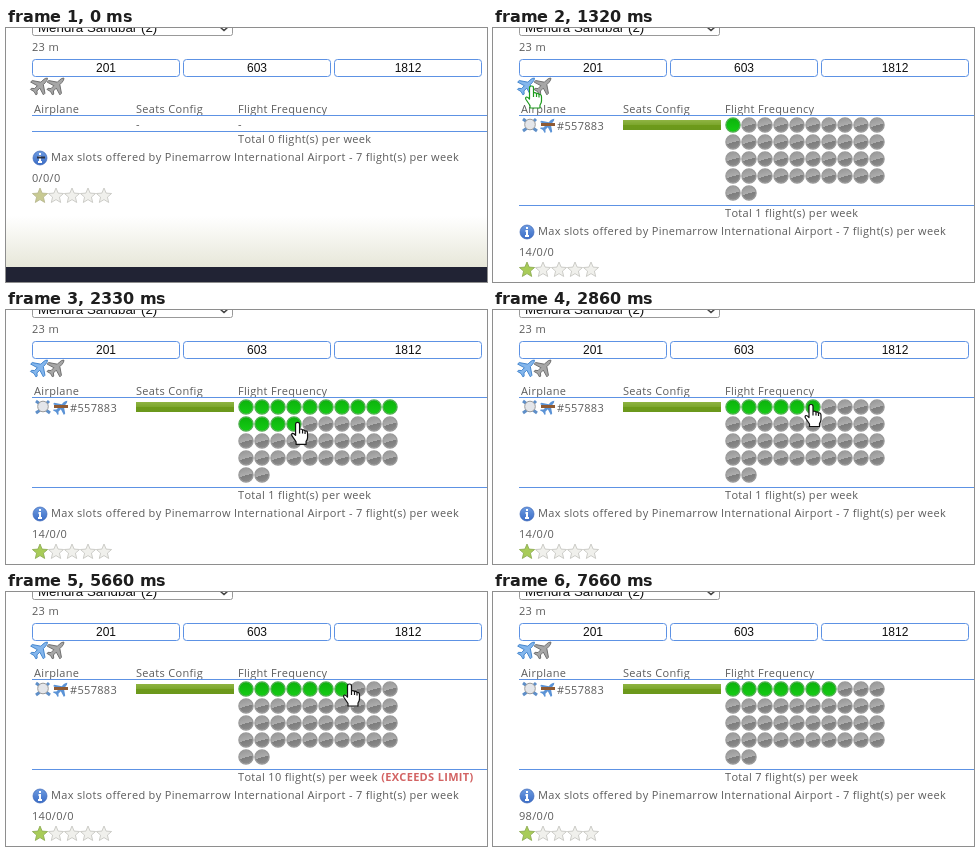
An HTML page for the animation above (7810 ms loop, 481x254 px).

```html
<!DOCTYPE html>
<html lang="en">
<head>
<meta charset="utf-8">
<style>
  html, body { margin: 0; width: 100%; height: 100%; overflow: hidden; background: #fff; }
  svg { display: block; width: 481px; height: 254px; }
  text { font: 11px "Open Sans", sans-serif; letter-spacing: .32px; font-kerning: none; fill: #5c5c5c; }
  .field { font: 12px "Liberation Sans", Arial, sans-serif; letter-spacing: 0; fill: #111; }
  .warning { font-weight: bold; fill: #d36464; }
  .rule { stroke: #5d92e4; }
  .dot { fill: url(#off); stroke: #999; stroke-width: 1.3; }
  .dot.lit { fill: url(#on); stroke: #4fae4f; }
  .plane { fill: #a6a6a6; stroke: #6c6c6c; stroke-width: .9; }
  .plane.chosen { fill: #84b6ec; stroke: #3f83cc; }
  .star { fill: #f0f0ec; stroke: #c2c2bd; stroke-width: .8; }
  .star:first-child { fill: #c8ca92; stroke: #b4b48c; }
  .loaded .star:first-child { fill: #a8cc58; stroke: #8aa850; }
  .loaded .before, svg:not(.loaded) .after { display: none; }
  svg:not(.loaded) #summary { transform: translateY(-74px); }
</style>
</head>
<body>
<svg id="stage" viewBox="0 0 481 254">
  <defs>
    <linearGradient id="page" x2="0" y2="1"><stop stop-color="#fff"/><stop offset="1" stop-color="#e7e7d9"/></linearGradient>
    <linearGradient id="bar" x2="0" y2="1"><stop stop-color="#8fb443"/><stop offset=".5" stop-color="#7ba62c"/><stop offset=".5" stop-color="#6d9a1a"/><stop offset="1" stop-color="#6b981c"/></linearGradient>
    <linearGradient id="off" x1=".35" x2=".65" y2="1"><stop stop-color="#989898"/><stop offset=".52" stop-color="#adadad"/><stop offset=".52" stop-color="#7d7d7d"/><stop offset="1" stop-color="#8c8c8c"/></linearGradient>
    <linearGradient id="on" x2="0" y2="1"><stop stop-color="#0cb20c"/><stop offset="1" stop-color="#14cc14"/></linearGradient>
    <linearGradient id="info" x2="0" y2="1"><stop stop-color="#6d9be0"/><stop offset="1" stop-color="#3a6cc6"/></linearGradient>
    <path id="plane" d="M0-10.5Q1.7-9 1.7-6V-3L9 2V4.2L1.7 2V6L4 8V9.5L0 8.5-4 9.5V8L-1.7 6V2L-9 4.2V2L-1.7-3V-6Q-1.7-9 0-10.5Z"/>
  </defs>

  <!-- aircraft picker -->
  <rect x="26.5" y="-14.5" width="200" height="22" rx="2" fill="#fff" stroke="#999"/>
  <text class="field" x="32" y="4" style="font-size:13.33px">Mendra Sandbar (2)</text>
  <path d="M214-1l4 3.5 4-3.5" fill="none" stroke="#444" stroke-width="1.5"/>
  <text x="26" y="23">23 m</text>
  <g id="fields"></g>
  <use id="firstPlane" class="plane" href="#plane" transform="translate(34 57.5) rotate(45)"/>
  <use class="plane" href="#plane" transform="translate(50.5 57.5) rotate(45)"/>

  <!-- table -->
  <text x="28" y="85">Airplane</text>
  <text x="130" y="85">Seats Config</text>
  <text x="232" y="85">Flight Frequency</text>
  <path class="rule" d="M26 87.5H481"/>
  <g class="before"><text x="130" y="100">-</text><text x="232" y="100">-</text></g>
  <g class="after">
    <path d="M30 91l4 3M43 91l-3 3M30 103l4-3M44 103l-4-3" stroke="#5f8fc8" stroke-width="3"/>
    <circle cx="37" cy="96.5" r="5.3" fill="#e4e6ea" stroke="#9a9a9a"/>
    <use href="#plane" transform="translate(55 97) rotate(45) scale(.85)" fill="#5b93d6"/>
    <path d="M48 95h14v3h-14z" fill="#8f5a33"/>
    <text x="64" y="102">#557883</text>
    <rect x="130" y="92" width="98" height="10" fill="url(#bar)"/>
    <g id="dots"></g>
  </g>

  <!-- summary and page foot -->
  <g id="summary">
    <path class="rule" d="M26 177.5H481"/>
    <text x="232" y="189"><tspan id="total"></tspan> <tspan id="warning" class="warning"></tspan></text>
    <circle cx="34" cy="204" r="7" fill="url(#info)" stroke="#3d68b8" stroke-width=".7"/>
    <path d="M34 199v2M32.5 203H34V208M32 208h4" fill="none" stroke="#fff" stroke-width="2"/>
    <path class="before" d="M31 203.5h8" stroke="#2b3142" stroke-width="2"/>
    <text x="45" y="207">Max slots offered by Pinemarrow International Airport - 7 flight(s) per week</text>
    <text id="seats" x="26" y="228"></text>
    <g id="stars"></g>
    <rect y="262" width="481" height="51" fill="url(#page)"/>
    <rect y="313" width="481" height="90" fill="#212334"/>
  </g>

  <g id="cursor" fill="#fff" stroke-linejoin="round">
    <path id="arrow" d="M.5.5V16.5L4.2 13 6.8 19 9.3 18 6.8 12H11.8Z"/>
    <path id="hand" stroke-width="1.2" d="M-2 2Q-2 0 0 0 2 0 2 2V7Q3.5 6 5 7.5 6.5 7 7.5 8.5 10 8 10 11V15Q10 17 8.5 19V22H-1.5V19.5L-5.5 13.5Q-6.5 11.5-5 11-4 10.8-2 13ZM2 7V11M5 7.5V11M7.5 8.5V11.5"/>
  </g>
</svg>
<script>
const LOOP = 7810, LOADED = 1320, SLOTS = 7, SEATS = 14;
const COLUMNS = 10, DOTS = 42, DOT = 16, ROW = 17, LEFT = 232, TOP = 89;
const HOVER_DELAY = 50;
const dotClicks = [4180, 4890, 6120];

const gestures = [
  { at: 50, lasts: 320, to: [38.5, 58] },     // to the first plane
  { at: 1390, lasts: 560, to: [297.5, 138] }, // into the dots
  { at: 2050, lasts: 450, to: [288, 97] },
  { at: 2730, lasts: 70, to: [318, 94.5] },
  { at: 3720, lasts: 160, to: [339, 96] },    // seventh dot
  { at: 4300, lasts: 210, to: [386, 97] },    // last of the row
  { at: 5350, lasts: 250, to: [343.5, 92] },  // back to the seventh
  { at: 6430, lasts: 160, to: [365, 290] },   // out at the bottom
  { at: 6600, lasts: 1, to: [490, 205] },
  { at: 7180, lasts: 400, to: [422, -30] }    // past the right edge
];

const el = id => document.getElementById(id);
const repeat = (n, make) => Array.from({ length: n }, (_, i) => make(i)).join("");

function cursorAt(t) {
  let x = 464, y = 285;
  for (const { at, lasts, to } of gestures) {
    const part = Math.min(1, Math.max(0, (t - at) / lasts));
    x += (to[0] - x) * part;
    y += (to[1] - y) * part;
  }
  return [x, y];
}

// Number of the dot under the fingertip, 0 for none
function hoveredDot(t) {
  const [x, y] = cursorAt(t), dx = x - LEFT, dy = y + 1.5 - TOP;
  const column = Math.floor(dx / DOT), row = Math.floor(dy / ROW);
  const index = row * COLUMNS + column;
  const hit = column >= 0 && column < COLUMNS && row >= 0 && dy % ROW < DOT && index < DOTS;
  return hit ? index + 1 : 0;
}

function flightsAt(t) {
  const click = dotClicks.filter(c => c <= t).pop();
  return click ? hoveredDot(click) : t < LOADED ? 0 : 1;
}

function starPoints(cx, cy) {
  return repeat(10, i => {
    const r = i % 2 ? 3.6 : 8, a = (i / 5 - .5) * Math.PI;
    return `${cx + r * Math.cos(a)},${cy + r * Math.sin(a)} `;
  });
}

el("fields").innerHTML = repeat(3, i =>
  `<rect x="${26.5 + 151 * i}" y="31.5" width="147" height="17" rx="3" fill="#fff" stroke="#5d92e4"/>
   <text class="field" x="${100 + 151 * i}" y="44" text-anchor="middle">${["201", "603", "1812"][i]}</text>`);
el("dots").innerHTML = repeat(DOTS, i =>
  `<circle class="dot" cx="${LEFT + 8 + DOT * (i % COLUMNS)}" cy="${TOP + 8 + ROW * Math.floor(i / COLUMNS)}" r="7.1"/>`);
el("stars").innerHTML = repeat(5, i =>
  `<polygon class="star" points="${starPoints(34 + 16 * i, 242)}"/>`);
const dots = document.querySelectorAll(".dot");

function draw(t) {
  const loaded = t >= LOADED, flights = flightsAt(t);
  const lit = loaded && hoveredDot(t - HOVER_DELAY) || flights;
  el("stage").classList.toggle("loaded", loaded);
  el("firstPlane").classList.toggle("chosen", loaded);
  dots.forEach((dot, i) => dot.classList.toggle("lit", i < lit));
  el("total").textContent = `Total ${flights} flight(s) per week`;
  el("warning").textContent = flights > SLOTS ? "(EXCEEDS LIMIT)" : "";
  el("seats").textContent = `${SEATS * flights}/0/0`;

  const [x, y] = cursorAt(t);
  const overPlane = x < 60 && y < 68;
  const overDots = loaded && x > LEFT && x < LEFT + COLUMNS * DOT && y > TOP && y < 173;
  const pointing = overPlane || overDots;
  el("cursor").setAttribute("transform", `translate(${x} ${y})`);
  el("cursor").setAttribute("stroke", overPlane && loaded ? "#1c9a1c" : "#111");
  el("hand").style.display = pointing ? "" : "none";
  el("arrow").style.display = pointing ? "none" : "";
}

function frame() {
  draw(performance.now() % LOOP);
  requestAnimationFrame(frame);
}
frame();
</script>
</body>
</html>
```
